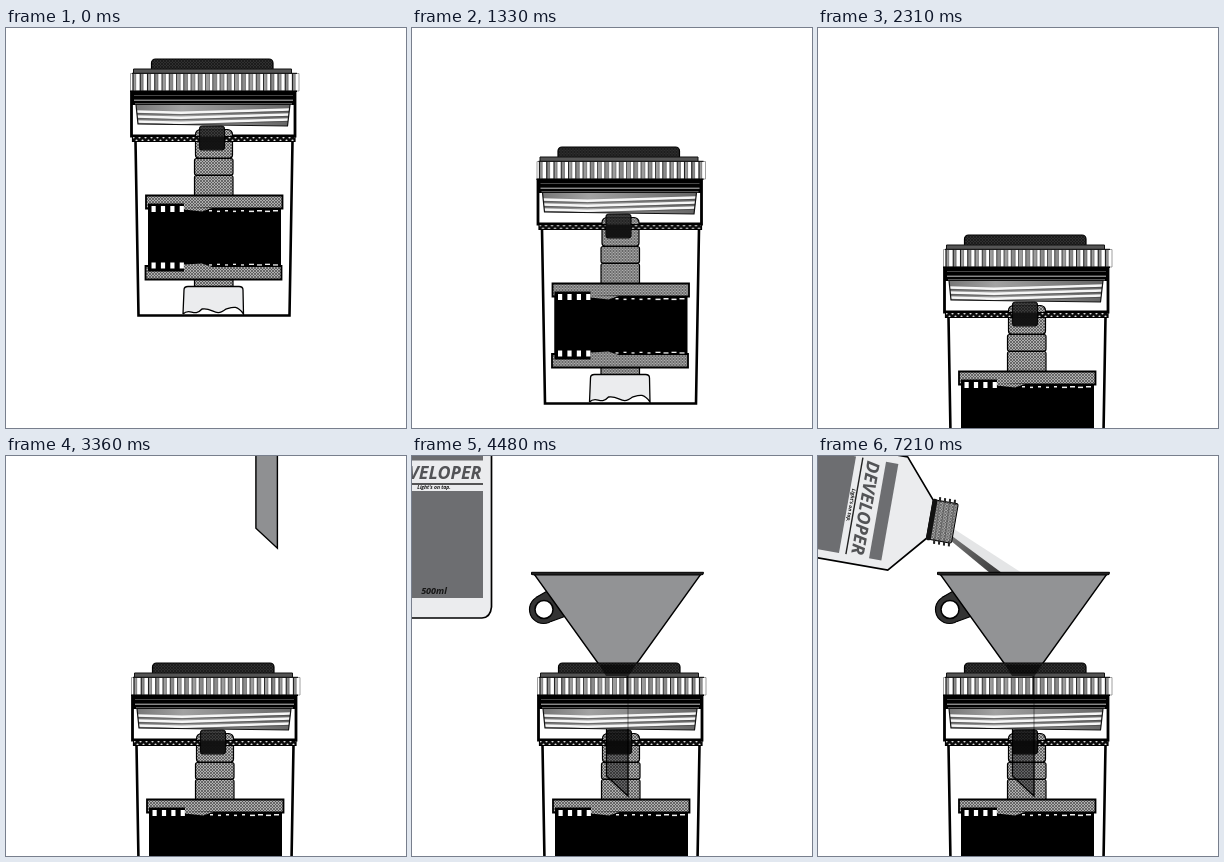
Write an HTML page with a canvas that moves like this. It is 400 px wide and 400 px high and loops after 8 s.

```html
<!DOCTYPE html>
<html lang="en">
<head>
<meta charset="utf-8">
<title>Developing tank</title>
<style>
html, body { margin: 0; width: 100%; height: 100%; overflow: hidden; background: #fff; }
canvas { display: block; width: 100vw; height: 100vh; }
</style>
</head>
<body>
<canvas id="stage" width="400" height="400"></canvas>
<script>
const ctx = document.getElementById('stage').getContext('2d');
const LOOP = 8000, STEP = 70;
const clamp = v => Math.max(0, Math.min(1, v));
const smooth = v => { v = clamp(v); return v * v * (3 - 2 * v); };
const mix = (a, b, k) => a + (b - a) * k;

function texture(size, base, paint) {
  const tile = document.createElement('canvas');
  tile.width = tile.height = size;
  const g = tile.getContext('2d');
  g.fillStyle = base;
  g.fillRect(0, 0, size, size);
  paint(g, size);
  return ctx.createPattern(tile, 'repeat');
}

const crosshatch = color => (g, size) => {
  g.strokeStyle = color;
  g.lineWidth = 0.7;
  g.beginPath();
  g.moveTo(-1, -1); g.lineTo(size + 1, size + 1);
  g.moveTo(size + 1, -1); g.lineTo(-1, size + 1);
  g.stroke();
};
const HATCH = texture(3, '#b0b0b0', crosshatch('#4a4a4a'));
const DARK = texture(3, '#303030', crosshatch('#161616'));
const DOTS = texture(6, '#0a0a0a', g => {
  g.fillStyle = '#ddd';
  for (const [x, y] of [[1.5, 1.5], [4.5, 4.5]]) {
    g.beginPath();
    g.arc(x, y, 1.05, 0, 7);
    g.fill();
  }
});

function finish(fill, stroke, width = 1) {
  if (fill) { ctx.fillStyle = fill; ctx.fill(); }
  if (stroke) { ctx.strokeStyle = stroke; ctx.lineWidth = width; ctx.stroke(); }
}
function rect(x, y, w, h, fill, stroke, width) {
  ctx.beginPath();
  ctx.rect(x, y, w, h);
  finish(fill, stroke, width);
}
function round(x, y, w, h, r, fill, stroke, width) {
  ctx.beginPath();
  ctx.roundRect(x, y, w, h, r);
  finish(fill, stroke, width);
}
function poly(points, fill, stroke, width, open) {
  ctx.beginPath();
  points.forEach(([x, y]) => ctx.lineTo(x, y));
  if (!open) ctx.closePath();
  finish(fill, stroke, width);
}
const line = (points, width = 1, color = '#000') => poly(points, null, color, width, true);

function drawReel() {
  // Central column
  round(189.5, 101.5, 37, 28.5, [5, 5, 3, 3], HATCH, '#000', 1.2);
  round(188.5, 130.5, 38.5, 16.5, 2, HATCH, '#000', 1.2);
  round(188.5, 147.5, 38.5, 21, 2, HATCH, '#000', 1.2);
  rect(188.5, 251, 38.5, 8, HATCH, '#000', 1.2);

  // Flanges and film
  rect(140, 167.5, 136.5, 13, HATCH, '#000', 1.8);
  rect(139.5, 238, 136, 13.5, HATCH, '#000', 1.8);
  rect(142, 181, 133, 57, '#000');
  rect(142, 175.5, 36, 68, '#000');
  poly([[178, 179], [206, 180], [196, 183.5], [178, 181.5]], HATCH);
  poly([[178, 240], [206, 239], [196, 235.5], [178, 236.5]], HATCH);
  for (let i = 0; i < 4; i++) {
    rect(145.5 + i * 9.4, 178, 4.2, 6, '#fff');
    rect(145.5 + i * 9.4, 234.5, 4.2, 6, '#fff');
  }
  for (let i = 0; i < 9; i++) {
    const x = 203 + i * 8, w = i > 4 ? 5 : 3;
    rect(x, 182 + i % 2 * 0.6, w, 1.5, '#eee');
    rect(x, 236.3 - i % 2 * 0.6, w, 1.3, '#eee');
  }

  // Foot
  ctx.beginPath();
  ctx.moveTo(177, 286);
  ctx.lineTo(178, 262);
  ctx.quadraticCurveTo(178, 258.5, 182, 258.5);
  ctx.lineTo(233, 258.5);
  ctx.quadraticCurveTo(237, 258.5, 237, 262);
  ctx.lineTo(237.5, 286);
  ctx.bezierCurveTo(231, 277, 227, 279, 220, 281);
  ctx.bezierCurveTo(209, 290, 207, 279, 196, 281);
  ctx.bezierCurveTo(188, 290, 184, 279, 177, 286);
  finish('#ebecee', '#000', 1.3);
}

function drawLid() {
  rect(125.5, 64.5, 163.5, 43.5, '#fff', '#000', 2.8);
  rect(126, 64, 163, 13, '#000');
  line([[128, 67.5], [287, 67.5]], 0.6, '#777');
  line([[128, 72.2], [287, 72.2]], 0.9, '#ddd');
  line([[129, 75.8], [286, 75.8]], 1.6, '#555');

  // Screw thread
  const thread = [[130, 76.5], [284, 76.5], [281.5, 98], [132, 96]];
  const sheen = ctx.createLinearGradient(130, 0, 284, 0);
  sheen.addColorStop(0, '#777');
  sheen.addColorStop(0.3, '#a2a2a2');
  sheen.addColorStop(1, '#666');
  poly(thread, sheen);
  ctx.save();
  ctx.clip();
  for (let i = 0; i < 3; i++) {
    const y = 84.5 + i * 5;
    line([[130, y - 1], [175, y + 0.3], [284, y - 3]], 2.6, '#f6f6f6');
    line([[130, y + 1], [175, y + 2.2], [284, y - 1.2]], 0.6, '#444');
  }
  ctx.restore();
  poly(thread, null, '#111', 1.2);
}

function drawTop() {
  round(145.5, 31, 121.5, 12, [4, 4, 0, 0], DARK, '#000', 1.2);
  rect(127.5, 41, 158, 4.5, '#555', '#111', 1);

  // Grip ribs, lighter and broader towards the middle
  rect(124.5, 45.5, 168.5, 17.5, '#fff', '#888', 0.8);
  const count = 23;
  for (let i = 0; i < count; i++) {
    const x = 127 + i * 7.25;
    const middle = Math.sin(Math.PI * (i + 0.5) / count);
    const w = 2.6 + 1.4 * middle;
    rect(x, 45.5, w, 17.5, i % 2 ? '#8a8a8a' : '#9c9c9c');
    line([[x, 45.5], [x, 63]], 1.3 - 0.6 * middle, '#222');
    line([[x + w, 45.5], [x + w, 63]], 0.6, '#555');
  }
  line([[126, 45.3], [291, 45.3]], 1);
  line([[124, 63.3], [291, 63.3]], 1.6);
}

function drawTank() {
  line([[129.5, 113], [132.5, 287.5], [283.5, 287.5], [286.5, 113]], 2.6);
  drawLid();
  drawReel();
  rect(126.5, 108.5, 162.5, 5, DOTS, '#000', 1.2);
  ctx.save();
  ctx.globalAlpha = 0.92;
  round(193.5, 98, 25, 24, 3, DARK, '#000', 1.2);
  rect(194, 109, 24, 12, '#111');
  ctx.restore();
  drawTop();
}

const STEM = [[194.5, 219], [194.5, 320], [216, 340], [216, 219]];
const COLLAR = [[187, 208.5], [224, 208.5], [216.5, 220], [194, 220]];

function drawFunnel() {
  ctx.beginPath();
  ctx.arc(131.5, 153.5, 14, 0, 7);
  finish('#333', '#000', 1.2);
  poly([[124, 141.5], [137, 134], [154, 160], [139, 165.5]], '#333');
  line([[124, 141.5], [137, 134]], 1.2);
  line([[154, 160], [139, 165.5]], 1.2);
  ctx.beginPath();
  ctx.arc(132, 153.5, 9, 0, 7);
  finish('#fff', '#000', 1.5);

  poly(STEM, '#8f9092', '#000', 1.4);
  poly([[122, 118], [289, 118], [224, 208.5], [187, 208.5]], '#929395', '#000', 1.4);
  poly(COLLAR, DOTS, '#000', 1.2);
  poly([[119.5, 116.3], [291.5, 116.3], [291, 118.5], [288, 119], [123, 119], [119.5, 118.5]],
    '#222', '#000', 1);
}

// The spout shows faintly through the tank parts
function drawStemInside(dx, dy) {
  const inside = (top, paint) => {
    ctx.save();
    ctx.beginPath();
    ctx.rect(0, top, 400, 400);
    ctx.clip();
    ctx.translate(dx, dy);
    paint();
    ctx.restore();
  };
  inside(207, () => {
    ctx.globalAlpha = 0.6;
    poly(COLLAR, '#000');
  });
  inside(273, () => {
    ctx.globalCompositeOperation = 'multiply';
    poly(STEM, '#8f9092', '#000', 1.2);
  });
  inside(220, () => {
    ctx.globalAlpha = 0.8;
    line([[215.5, 218], [215.5, 240]], 2);
    ctx.globalAlpha = 0.4;
    line([[216, 240], [216, 340], [212, 336]], 1.2);
  });
}

function label(text, size, y, color) {
  ctx.font = `italic bold ${size}px "Open Sans", sans-serif`;
  ctx.fillStyle = color;
  ctx.fillText(text, 22, y);
}

function drawBottle() {
  ctx.beginPath();
  ctx.moveTo(3, -49);
  ctx.lineTo(41, -49);
  ctx.lineTo(79.5, -16);
  ctx.lineTo(79.5, 151);
  ctx.quadraticCurveTo(78.5, 161.5, 70, 162);
  ctx.lineTo(-26, 162);
  ctx.quadraticCurveTo(-34.5, 161.5, -35.5, 151);
  ctx.lineTo(-35.5, -16);
  ctx.closePath();
  finish('#ebecee', '#000', 1.7);

  // Neck with thread
  round(2, -74, 40, 25, 2, HATCH, '#000', 1);
  round(1, -53, 42, 5, 2, '#111');
  for (let i = 0; i < 4; i++) {
    const y = -71 + i * 5;
    line([[-1.5, y + 1], [3.5, y + 0.5]], 2, '#222');
    line([[40.5, y - 0.5], [45.5, y - 1]], 2, '#222');
    line([[2, y + 1], [42, y - 1]], 0.7, '#555');
  }

  // Label
  rect(-27, -8, 98, 12.5, '#6d6e71');
  rect(-27, 35, 98, 107, '#6d6e71');
  line([[-27, 28], [71, 28]], 1.4, '#222');
  ctx.textAlign = 'center';
  label('DEVELOPER', 17.9, 23, '#525356');
  label("Light's on tap.", 5, 33.2, '#111');
  label('500ml', 9, 138, '#161616');
}

function drawStream(step) {
  const grow = clamp((step - 97) / 5);
  if (!grow) return;
  const open = clamp((step - 98) / 5);
  const reach = (x0, y0, x1, y1) => [mix(x0, x1, grow), mix(y0, y1, grow)];
  poly([[136, 73], reach(136, 73, 204, 117), reach(132, 84, 172, 117), [132, 84]], '#e4e5e6');
  const shade = ctx.createLinearGradient(132, 78, 182, 117);
  shade.addColorStop(0, '#777');
  shade.addColorStop(1, '#3a3a3a');
  poly([[134, 80], reach(134, 80, 184, 117), reach(132, 83, mix(184, 172, open), 117),
    [132, mix(81, 84, open)]], shade);
}

function draw(time) {
  const step = Math.floor(time % LOOP / STEP);
  ctx.setTransform(1, 0, 0, 1, 0, 0);
  ctx.fillStyle = '#fff';
  ctx.fillRect(0, 0, 400, 400);

  const sink = smooth((step - 5) / 28);
  const left = Math.max(0, Math.min(20, 64 - step));
  const away = Math.pow(left / 9, 1.86);
  const dx = 19 * away, dy = -85 * away;
  const entering = step >= 45;

  drawStream(step);
  if (entering) {
    ctx.save();
    ctx.translate(dx, dy);
    drawFunnel();
    ctx.restore();
  }

  ctx.save();
  ctx.translate(sink, 176 * sink);
  drawTank();
  ctx.restore();

  if (entering) {
    drawStemInside(dx, dy);
    ctx.save();
    ctx.translate(-12 * away, -78 * away);
    ctx.translate(20, 45);
    ctx.rotate(smooth((step - 78) / 22) * 100 * Math.PI / 180);
    ctx.translate(-20, -45);
    drawBottle();
    ctx.restore();
  }
}

const start = performance.now();
function tick() {
  draw(performance.now() - start);
  requestAnimationFrame(tick);
}
tick();
</script>
</body>
</html>
```
